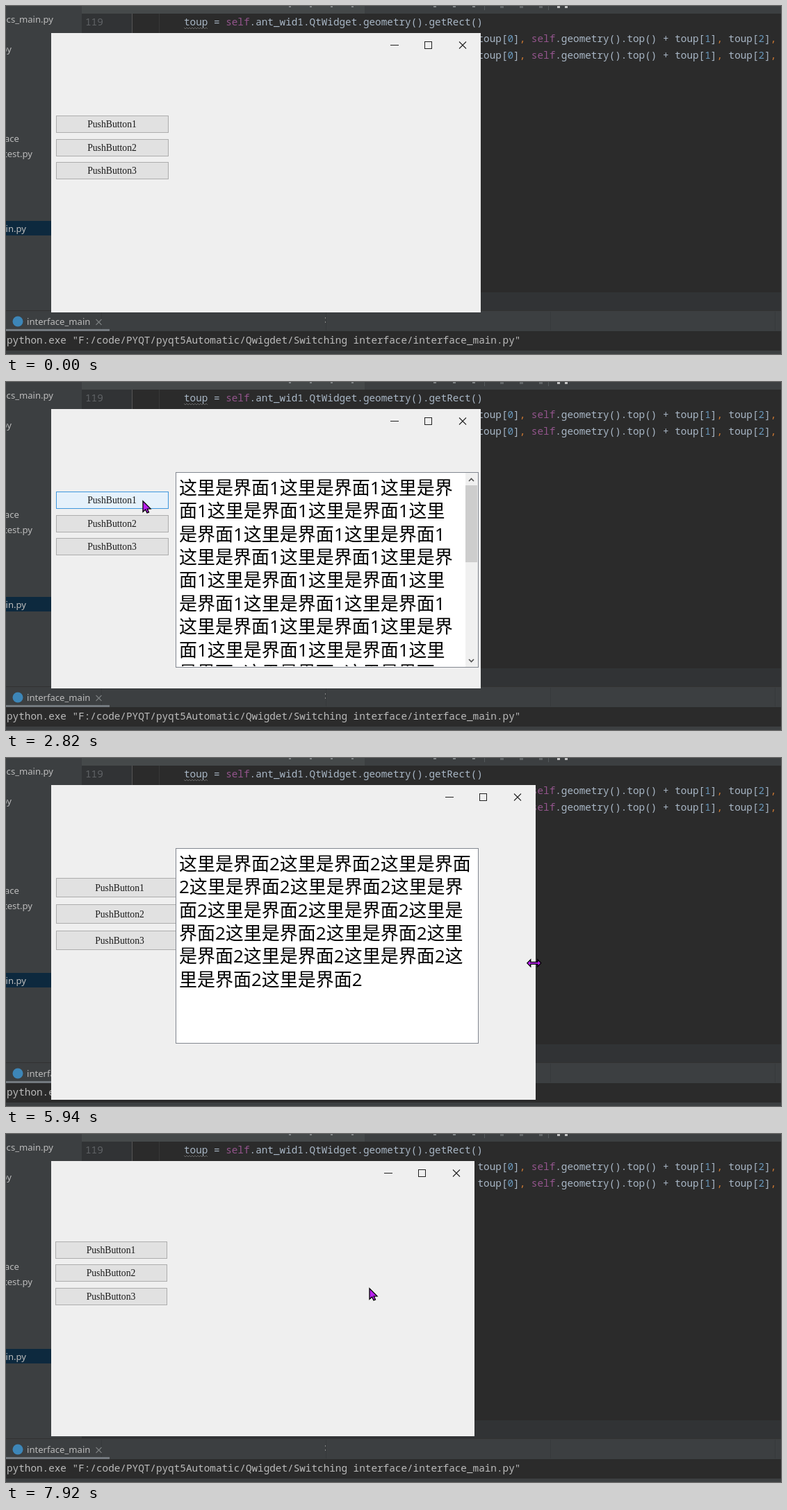
An HTML page with a canvas that plays this animation: 1115 px wide and 502 px high, repeating every 8000 ms.

```html
<!DOCTYPE html>
<html lang="zh-CN">
<head>
<meta charset="utf-8">
<title>Switching interface</title>
<style>
html, body { margin: 0; width: 100%; height: 100%; overflow: hidden; background: #2b2b2b; }
canvas { display: block; width: 1115px; height: 502px; }
</style>
</head>
<body>
<canvas id="stage" width="1115" height="502"></canvas>
<script>
const g = document.getElementById('stage').getContext('2d');
const LOOP = 8000, STEP = 70, LEFT = 65, TOP = 39, BASE_W = 618;
const MONO = '14.33px "Noto Sans Mono", monospace';
const UI = '13.1px "Noto Sans", sans-serif';
const BUTTON = '13.7px "Liberation Serif", serif';
const PAGE = '26px "Open Sans", "Noto Sans CJK SC", "Noto Sans CJK", sans-serif';

// Pointer moves: start, end, x, y
const moves = [
  [100, 590, 182, 165], [1260, 1680, 182, 199], [2210, 2480, 196, 171], [3020, 3160, 190, 202],
  [3500, 4190, 687, 287], [4390, 4730, 677, 296], [4990, 5130, 677, 285], [5390, 5390, 681, 291],
  [5660, 6010, 762, 296], [6550, 6830, 672, 300], [6870, 6940, 599, 305], [7010, 7360, 217, 206],
  [7570, 7920, 522, 222]
];
const DRAG_FROM = 5660, DRAG_TO = 6870;
// Clicks: time, page; clicking the open page closes it
const clicks = [[860, 1], [2000, 2], [2680, 1], [3360, 2], [7500, 2]];

const within = (v, a, b) => v >= a && v < b;

function pointerAt(t) {
  let x = 1146, y = 557;
  for (const [start, end, tx, ty] of moves) {
    if (t < start) break;
    const steps = Math.floor((t - start) / STEP) + 1;
    const u = Math.min(1, steps * STEP / (end - start + STEP)), ease = 1 - (1 - u) ** 2;
    x += (tx - x) * ease;
    y += (ty - y) * ease;
  }
  return [x, y];
}

const pageAt = t => clicks.reduce((page, [at, n]) =>
  t < at + 2 * STEP ? page : n === page ? 0 : n, 0);

function box(x, y, w, h, fill, stroke) {
  g.fillStyle = fill;
  g.fillRect(x, y, w, h);
  if (!stroke) return;
  g.strokeStyle = stroke;
  g.lineWidth = 1;
  g.strokeRect(x + .5, y + .5, w - 1, h - 1);
}

function row(x, gap, n, w, h, color) {
  for (let i = 0; i < n; i++) box(x + i * gap, 0, w, h, color);
}

function text(s, x, y, font, color, align = 'left') {
  g.font = font;
  g.fillStyle = color;
  g.textAlign = align;
  g.fillText(s, x, y);
}

function line(color, width, ...pts) {
  g.strokeStyle = color;
  g.lineWidth = width;
  g.beginPath();
  pts.forEach(([x, y]) => g.lineTo(x, y));
  g.stroke();
}

function cross(x, y, r, color) {
  line(color, 1.1, [x - r, y - r], [x + r, y + r]);
  line(color, 1.1, [x - r, y + r], [x + r, y - r]);
}

function chevron(x, y, dir) {
  line('#505050', 1.6, [x - 3.5, y], [x, y + 3.5 * dir], [x + 3.5, y]);
}

function shape(x, y, pts) {
  g.beginPath();
  pts.forEach(([px, py]) => g.lineTo(x + px, y + py));
  g.closePath();
  g.fillStyle = '#b820ef';
  g.fill();
  g.strokeStyle = '#000';
  g.lineWidth = 1.3;
  g.stroke();
}

function code(s, x, y) {
  const colors = { self: '#94558d', ',': '#cc7832' };
  for (const part of s.split(/(\bself\b|\b\d\b|,)/)) {
    text(part, x, y, MONO, colors[part] || (/^\d$/.test(part) ? '#6897bb' : '#a9b7c6'));
    x += g.measureText(part).width;
  }
}

function editor() {
  box(0, 0, 1115, 502, '#2b2b2b');
  box(0, 0, 109, 440, '#3c3f41');
  box(109, 0, 72, 440, '#313335');
  box(109, 0, 407, 11, '#45494a');
  box(516, 0, 599, 11, '#3c3f41');
  row(688, 92, 2, 1, 6, '#555a5c');
  row(407, 30, 4, 3, 2, '#7f8385');
  row(615, 28, 3, 4, 2, '#7f8385');
  row(711, 28, 3, 5, 3, '#606466');
  row(793, 11, 2, 4, 3, '#c0c0c0');
  box(181, 11, 1, 30, '#555');
  box(220, 11, 1, 30, '#373737');

  box(0, 310, 109, 21, '#0d293e');
  text('cs_main.py', 68, 24, UI, '#bbb', 'right');
  text('.py', 8, 67, UI, '#bbb', 'right');
  text('ace', 19, 196, UI, '#bbb', 'right');
  text('test.py', 38, 218, UI, '#bbb', 'right');
  text('in.py', 29, 326, UI, '#bbb', 'right');

  text('119', 114, 28, MONO, '#606366');
  code('toup = self.ant_wid1.QtWidget.geometry().getRect()', 256, 28);
  const wave = Array.from({ length: 18 }, (_, i) => [256 + 2 * i, 31 + i % 2 * 2]);
  line('#777', .8, ...wave);
  for (const y of [52, 76]) code('toup[0], self.geometry().top() + toup[1], toup[2],', 678.5, y);

  box(109, 413, 1006, 27, '#313335');
  box(0, 440, 1115, 29, '#3c3f41');
  box(0, 439, 1115, 1, '#323232');
  for (let x = 137; x < 1115; x += 323) box(x, 441, 1, 27, '#36393b');
  box(459, 449, 1, 2, '#888');
  box(459, 455, 1, 2, '#888');
  box(0, 466, 149, 3, '#747a80');
  g.fillStyle = '#3d86b8';
  g.beginPath();
  g.arc(17, 455, 7.5, 0, 7);
  g.fill();
  text('interface_main', 30, 460, UI, '#bbb');
  cross(133.5, 456, 4, '#7d8082');
  text('python.exe "F:/code/PYQT/pyqt5Automatic/Qwigdet/Switching interface/interface_main.py"',
    1, 487, MONO, '#bbb');
  box(0, 497, 1115, 5, '#3c3f41');
}

function panel(page, s) {
  const lift = s < 1 ? 1 : 0;
  const x = Math.round(LEFT + 179 * s), y = Math.round(TOP + 90.8 * s - lift);
  const r = Math.round(LEFT + 615 * s), b = Math.round(TOP + 372.8 * s - lift);
  box(x, y, r - x, b - y, '#fff', '#828790');
  g.save();
  g.beginPath();
  g.rect(x + 1, y + 1, r - x - 2, b - y - 3);
  g.clip();
  const words = ('这里是界面' + page).repeat(page === 1 ? 24 : 16), cols = page === 1 ? 16 : 17;
  for (let i = 0; i * cols < words.length; i++)
    text(words.slice(i * cols, (i + 1) * cols), x + 5, y + 31.7 + i * 33.4, PAGE, '#000');
  g.restore();
  if (page === 1) {
    box(r - 19, y + 1, 18, b - y - 2, '#f0f0f0');
    box(r - 19, y + 19, 17, 111, '#cdcdcd');
    chevron(r - 10.5, y + 13, -1);
    chevron(r - 10.5, b - 12, 1);
  }
}

function button(i, t, s, px, py) {
  const x = Math.round(LEFT + 6.5 * s), w = Math.round(LEFT + 169 * s) - x;
  const y = Math.round(TOP + (119 + 33.7 * i) * s - (s < 1 ? 1 : 0)), h = Math.round(25 * s);
  const down = clicks.some(([at, n]) => n === i + 1 && within(t, at, at + STEP));
  const hover = within(px, x, x + w) && within(py, y, y + h);
  const [fill, edge] = down ? ['#cce4f7', '#005499'] : hover ? ['#e5f1fb', '#3f97dd'] : ['#e1e1e1', '#adadad'];
  box(x, y, w, h, fill, edge);
  text('PushButton' + (i + 1), x + w / 2 - .5, y + h / 2 + 4.5, BUTTON, '#1a1a1a', 'center');
}

function appWindow(t, right, px, py) {
  const w = right - LEFT, s = w / BASE_W;
  box(LEFT, TOP, w, Math.round(w * .652), '#efefef');
  box(right - 130, 56, 12, 1, '#222');
  box(right - 81, 51, 11, 11, '#efefef', '#222');
  cross(right - 26, 56.5, 5, '#222');
  for (let i = 0; i < 3; i++) button(i, t, s, px, py);
  const page = pageAt(t);
  if (page) panel(page, Math.min(1, s));
}

function pointer(x, y, right) {
  if (Math.abs(x - right) < 5) {
    const half = [[-10, 0], [-5, -5], [-5, -1.5], [5, -1.5], [5, -5]];
    shape(x, y, [...half, ...half.map(([a, b]) => [-a, -b])]);
  } else {
    shape(x + 1, y + .8, [[0, 0], [0, 15.5], [3.6, 12.2], [6, 17], [8.5, 16], [6.2, 11.2], [11, 11]]);
  }
}

function draw() {
  const t = performance.now() % LOOP;
  const [px, py] = pointerAt(t);
  const right = t < DRAG_FROM ? 683 : t < DRAG_TO ? Math.round(px + 2) : 674;
  editor();
  appWindow(t, right, px, py);
  pointer(px, py, right);
  requestAnimationFrame(draw);
}
draw();
</script>
</body>
</html>
```
